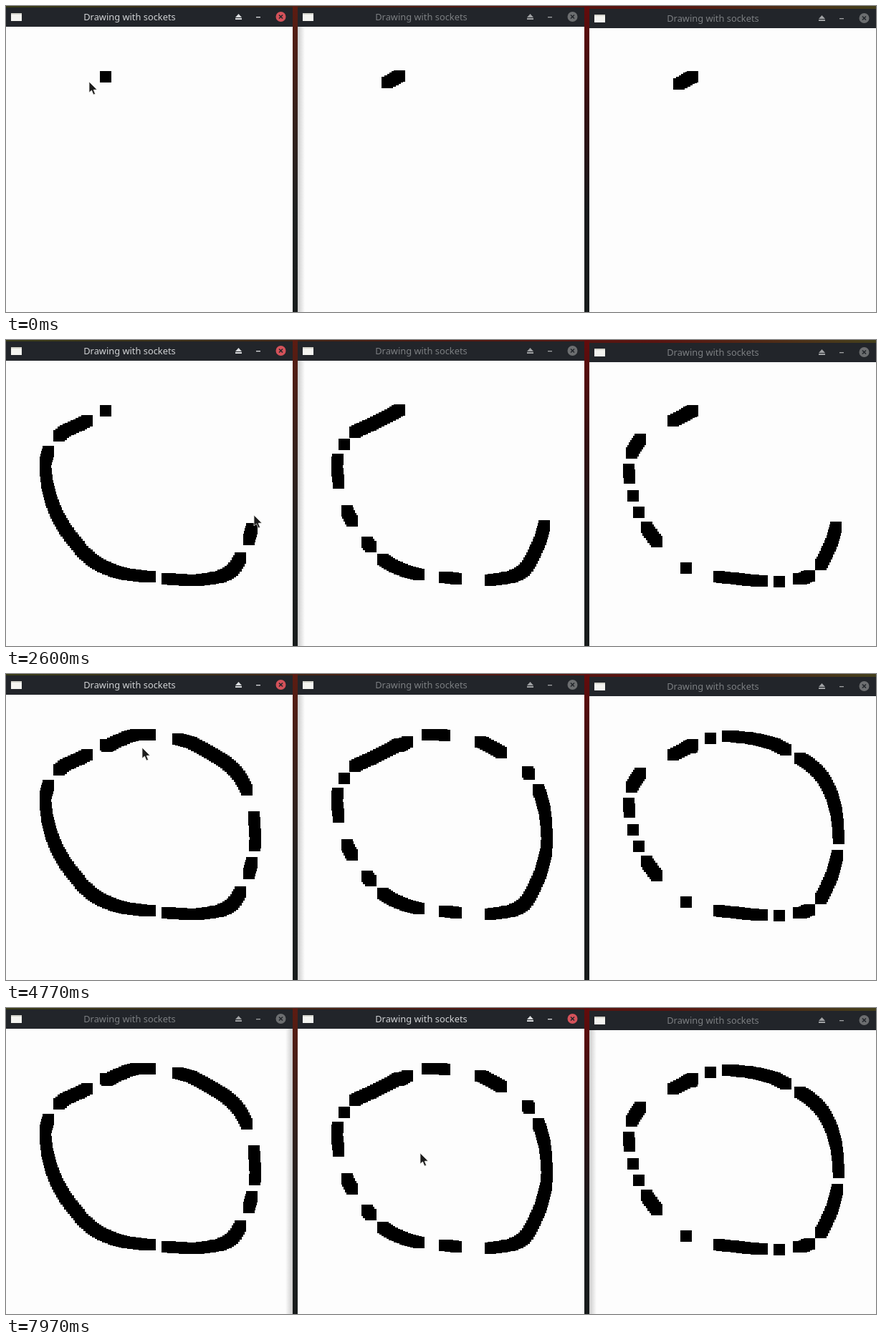
An HTML page with a canvas for the animation above (8000 ms loop, 1214 by 428 pixels).

```html
<!DOCTYPE html>
<html lang="en">
<head>
<meta charset="utf-8">
<title>Drawing with sockets</title>
<style>
html, body { margin: 0; height: 100%; overflow: hidden; background: #181a1c; }
canvas { display: block; }
</style>
</head>
<body>
<canvas id="stage" width="1214" height="428"></canvas>
<script>
const ctx = document.getElementById('stage').getContext('2d');
const LOOP = 8000, DRAW_END = 4200, FOCUS_CHANGE = 6300;
const BRUSH = 16, STAMPS_PER_SPAN = 10, POINTER_LEAD = 2;
const BAR = '#22252a', PAPER = '#fdfdfd';

// Evenly spaced key points of the hand-drawn loop, in window coordinates.
const keyPoints = [
  [144, 97], [109, 115], [74, 134], [56, 167], [59, 208], [72, 246], [94, 280], [122, 309],
  [157, 325], [197, 331], [237, 335], [277, 335], [313, 324], [334, 290], [346, 252], [347, 212],
  [340, 173], [321, 137], [291, 114], [255, 95], [217, 87], [177, 86], [141, 101]
];
const LAST_STAMP = (keyPoints.length - 1) * STAMPS_PER_SPAN;

// Every lost packet drops the stamps closer than three to it.
const windows = [
  { x: 0, y: 0, lost: [-1, 5.5, 23.5, 94, 129.5, 140, 156, 160, 197, 201] },
  { x: 407, y: 0, lost: [-2, 21, 27, 41, 45, 55, 58, 66, 86, 89, 99.5, 105, 166,
      173.5, 179, 193.5, 199.5, 212.5] },
  { x: 814, y: 2, lost: [11.5, 17.5, 30, 39, 45, 51, 63.5, 69, 71, 77.5, 83, 104, 110.5,
      121, 143, 182, 209, 215.5] }
];

// Time and stamps sent; time and pointer position once the loop is closed.
const progress = [[0, 6], [730, 48], [1770, 101], [3430, 176], [DRAW_END, LAST_STAMP]];
const wander = [[DRAW_END, 141, 96], [4770, 190, 103], [6500, 467, 67], [7100, 562, 240], [7970, 578, 203]];

const mix = (a, b, k) => a.map((v, i) => v + (b[i] - v) * k);

function keyed(keys, t) {
  const i = keys.findIndex(key => key[0] > t);
  if (i < 0) return keys[keys.length - 1];
  const a = keys[i - 1], b = keys[i];
  return mix(a, b, (t - a[0]) / (b[0] - a[0]));
}

// Catmull-Rom curve through the key points.
function strokeAt(stamp) {
  const p = Math.min(stamp, LAST_STAMP) / STAMPS_PER_SPAN;
  const i = Math.min(Math.floor(p), keyPoints.length - 2), k = p - i;
  const [a, b, c, d] = [i - 1, i, i + 1, i + 2].map(
    n => keyPoints[Math.max(0, Math.min(n, keyPoints.length - 1))]);
  return b.map((v, n) => v + k / 2 * (c[n] - a[n]
    + k * (2 * a[n] - 5 * v + 4 * c[n] - d[n] + k * (3 * (v - c[n]) + d[n] - a[n]))));
}

function rect(color, x, y, w, h) {
  ctx.fillStyle = color;
  ctx.fillRect(x, y, w, h);
}

function gradient(x0, y0, x1, y1, ...colors) {
  const g = ctx.createLinearGradient(x0, y0, x1, y1);
  colors.forEach((c, i) => g.addColorStop(i / (colors.length - 1), c));
  return g;
}

function polygon(color, points) {
  ctx.beginPath();
  points.forEach(([x, y]) => ctx.lineTo(x, y));
  ctx.closePath();
  ctx.fillStyle = color;
  ctx.fill();
}

function drawDesktop() {
  rect(gradient(0, 0, 1214, 0, '#3a3c18', '#3c2a14', '#501810', '#5a1410', '#44401c'), 0, 0, 1214, 4);
  rect(gradient(0, 0, 0, 428, '#5c1c12', '#38201a', '#1e2020', '#181c1c'), 400, 0, 7, 428);
  rect(gradient(0, 0, 0, 428, '#640c0c', '#341012', '#181a1c', '#181c1c'), 807, 0, 7, 428);
}

function drawTitleBar(active) {
  rect(BAR, 0, 2, 400, 27);
  rect('#f4f4f0', 7, 10, 15, 11);
  rect('#d4d4cc', 7, 10, 15, 2);
  ctx.font = '12.85px "Noto Sans", sans-serif';
  ctx.textAlign = 'center';
  ctx.fillStyle = active ? '#d0d2d4' : '#7c7f82';
  ctx.fillText('Drawing with sockets', 172.5, 20);
  const icons = active ? '#dcdee0' : '#a0a2a4';
  polygon(icons, [[324.5, 11], [329, 16], [320, 16]]);
  rect(icons, 320, 17, 9, 2);
  rect(icons, 349, 15, 6, 1.3);
  ctx.beginPath();
  ctx.arc(383.5, 15, 7, 0, 7);
  ctx.fillStyle = active ? '#d4525a' : '#6c6e70';
  ctx.fill();
  ctx.beginPath();
  ctx.moveTo(381, 12.5); ctx.lineTo(386, 17.5);
  ctx.moveTo(386, 12.5); ctx.lineTo(381, 17.5);
  ctx.strokeStyle = BAR;
  ctx.lineWidth = 1.5;
  ctx.stroke();
}

function drawWindow({ x, y, lost }, sent, active) {
  ctx.save();
  ctx.translate(x, y);
  drawTitleBar(active);
  rect(PAPER, 0, 29, 400, 399);
  ctx.fillStyle = '#000';
  for (let i = 0; i <= sent; i++) {
    if (lost.some(m => Math.abs(i - m) < 3)) continue;
    const [cx, cy] = strokeAt(i);
    ctx.fillRect(Math.round(cx - BRUSH / 2), Math.round(cy - BRUSH / 2), BRUSH, BRUSH);
  }
  ctx.restore();
}

// The focused window darkens the facing edges of its neighbours.
function drawShadow(left) {
  const shade = 'rgba(0,0,0,0.2)', clear = 'rgba(0,0,0,0)';
  rect(gradient(left - 7, 0, left - 17, 0, shade, clear), left - 17, 29, 10, 399);
  rect(gradient(left + 407, 0, left + 417, 0, shade, clear), left + 407, 29, 10, 399);
}

function drawPointer(x, y) {
  ctx.save();
  ctx.translate(Math.round(x), Math.round(y));
  polygon('#1c1c1c', [[0, 0], [0, 15], [3.5, 12], [6, 18], [8.5, 17], [6.2, 11.3], [11, 11]]);
  ctx.strokeStyle = '#e8e8e4';
  ctx.lineWidth = 0.8;
  ctx.stroke();
  ctx.restore();
}

function pointerAt(t, sent) {
  if (t >= DRAW_END) return keyed(wander, t).slice(1);
  const [x, y] = strokeAt(sent + POINTER_LEAD);
  return [x, y - 5];
}

function draw(t) {
  const [, sent] = keyed(progress, t);
  const focused = t < FOCUS_CHANGE ? 0 : 1;
  drawDesktop();
  windows.forEach((win, i) => drawWindow(win, sent, i === focused));
  drawShadow(windows[focused].x);
  drawPointer(...pointerAt(t, sent));
}

const began = performance.now();
function frame() {
  draw((performance.now() - began) % LOOP);
  requestAnimationFrame(frame);
}
frame();
</script>
</body>
</html>
```
